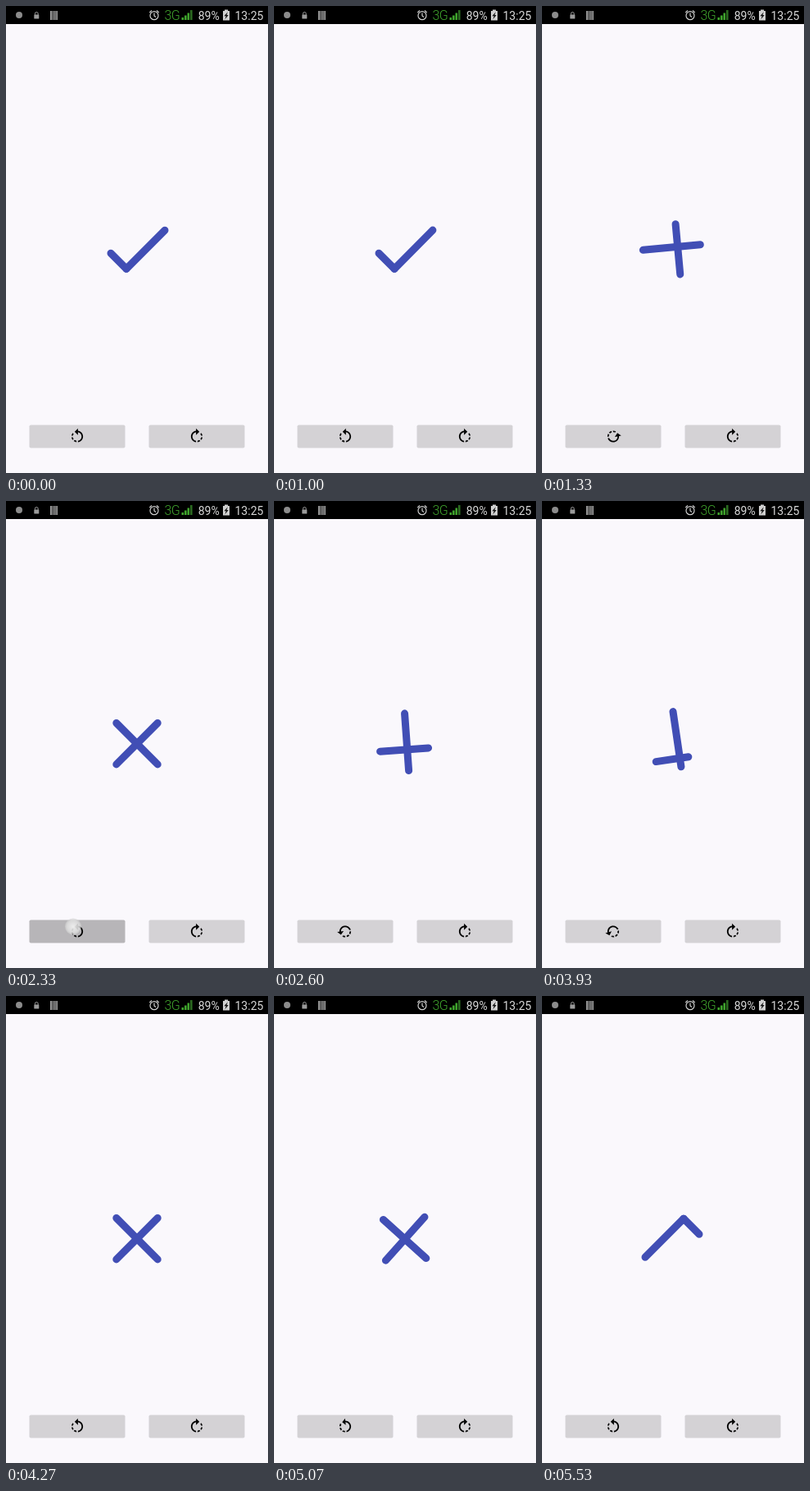
Write an HTML page that moves like this. It is 320 px wide and 569 px high and loops after 5870 ms.

```html
<!DOCTYPE html>
<html lang="en">
<head>
<meta charset="utf-8">
<title>Cross and check</title>
<style>
  html, body { margin: 0; width: 100%; height: 100%; overflow: hidden; background: #faf8fc; }
  svg { display: block; width: 100vw; height: 100vh; }
  text { font-family: Roboto, sans-serif; font-size: 14px; fill: #d8d8d8; }
  .btn { fill: #d4d2d5; }
  .btn.down { fill: #b7b5b8; }
  .mark { stroke: #414eb5; stroke-width: 9; stroke-linecap: round; }
</style>
</head>
<body>
<svg viewBox="0 0 320 569" xmlns="http://www.w3.org/2000/svg">
  <defs>
    <radialGradient id="glow">
      <stop offset="0" stop-color="#f0f0f0" stop-opacity=".95"/>
      <stop offset=".75" stop-color="#dedede" stop-opacity=".85"/>
      <stop offset="1" stop-color="#d0d0d0" stop-opacity=".6"/>
    </radialGradient>
    <path id="turn" transform="scale(.889) translate(-12 -12)" d="M7.11 8.53 5.7 7.11C4.8 8.27 4.24 9.61 4.07 11h2.02c.14-.87.49-1.72 1.02-2.47zM6.09 13H4.07c.17 1.39.72 2.73 1.62 3.89l1.41-1.42c-.52-.75-.87-1.59-1.01-2.47zm1.01 5.32c1.16.9 2.51 1.44 3.9 1.61V17.9c-.87-.15-1.71-.49-2.46-1.03L7.1 18.32zM13 4.07V1L8.45 5.55 13 10V6.09c2.84.48 5 2.94 5 5.91s-2.16 5.43-5 5.91v2.02c3.95-.49 7-3.85 7-7.93s-3.05-7.44-7-7.93z"/>
  </defs>

  <rect width="320" height="569" fill="#faf8fc"/>

  <!-- status bar -->
  <rect width="320" height="22" fill="#000"/>
  <circle cx="16" cy="11" r="4" fill="#8c8c8c"/>
  <g fill="#9a9a9a">
    <rect x="34.3" y="10.5" width="6" height="5" rx=".6"/>
    <path d="M35.4 11V9.4a1.9 1.9 0 0 1 3.8 0V11" fill="none" stroke="#9a9a9a"/>
    <path d="M54 6h2v11h-2zM56.7 6h1.6v11h-1.6zM59 6h1.6v11H59zM61.3 6h1.7v11h-1.7z"/>
  </g>
  <g fill="none" stroke="#cfcfcf" stroke-width="1.2">
    <circle cx="181" cy="11.7" r="5"/>
    <path d="M181 8.6v3.4l2 1.4M175.3 8l2.7-2.6M186.7 8 184 5.4"/>
  </g>
  <text x="193.6" y="17" style="font-size:16px;font-weight:300;letter-spacing:-.7px;fill:#3fa32c">3G</text>
  <path fill="#3fa32c" d="M214.5 14h2.6v3h-2.6zM218 11.5h2.6V17H218zM221.5 8.5h2.6V17h-2.6z"/>
  <path fill="#2b6a20" d="M225 5h2.6v12H225z"/>
  <text x="234.7" y="16.5">89%</text>
  <path fill="#d0d0d0" d="M267 4.5h4V6h2v11.5h-8V6h2z"/>
  <path fill="#111" d="M270.8 7.3 266.4 12.2h2.3l-1.3 4 4.3-5.2h-2.3z"/>
  <text x="279.5" y="16.5">13:25</text>

  <g id="shape" class="mark">
    <line id="short"/>
    <line id="long"/>
  </g>

  <rect id="left" class="btn" x="28.5" y="510.5" width="117" height="28" rx="1.8"/>
  <rect class="btn" x="174.5" y="510.5" width="117" height="28" rx="1.8"/>
  <use id="icon" href="#turn"/>
  <use href="#turn" transform="translate(233 524.5) scale(-1 1)"/>
  <circle id="touch" cx="82" cy="518.5" r="10" fill="url(#glow)"/>
</svg>

<script>
const LOOP = 5870, FPS = 15, MORPH = 500;

// Each line is x1, y1, x2, y2 around the centre of the mark.
const CHECK = { short: [-32, 5.5, -13, 24.5], long: [-13, 24.5, 34, -22.5] };
const CROSS = { short: [-25.2, -25.2, 25.2, 25.2], long: [-25.2, 25.2, 25.2, -25.2] };

const TAPS = [
  { press: 930,  release: 1000, start: 989,  from: CHECK, to: CROSS },
  { press: 2330, release: 2460, start: 2425, from: CROSS, to: CHECK },
  { press: 3660, release: 3800, start: 3750, from: CHECK, to: CROSS },
  { press: 4930, release: 5060, start: 5025, from: CROSS, to: CHECK }
];

const $ = id => document.getElementById(id);
const [shape, left, icon, touch] = ['shape', 'left', 'icon', 'touch'].map($);
const ease = x => (1 - Math.cos(Math.PI * Math.min(1, Math.max(0, x)))) / 2;

function setLine(id, from, to, p) {
  ['x1', 'y1', 'x2', 'y2'].forEach((name, i) =>
    $(id).setAttribute(name, from[i] + (to[i] - from[i]) * p));
}

function draw(t) {
  const tap = TAPS.filter(s => s.press <= t).pop() || TAPS[0];
  const p = ease((t - tap.start) / MORPH);
  const down = t >= tap.press && t < tap.release;
  for (const id of ['short', 'long']) setLine(id, tap.from[id], tap.to[id], p);
  shape.setAttribute('transform', `translate(160 295.7) rotate(${-180 * p})`);
  icon.setAttribute('transform', `translate(87 524.5) rotate(${-360 * p})`);
  left.classList.toggle('down', down);
  touch.style.display = down ? '' : 'none';
}

const origin = performance.now();

function tick() {
  const t = (performance.now() - origin) % LOOP;
  draw(Math.floor((t + 5) * FPS / 1000) * 1000 / FPS);
  requestAnimationFrame(tick);
}
tick();
</script>
</body>
</html>
```
